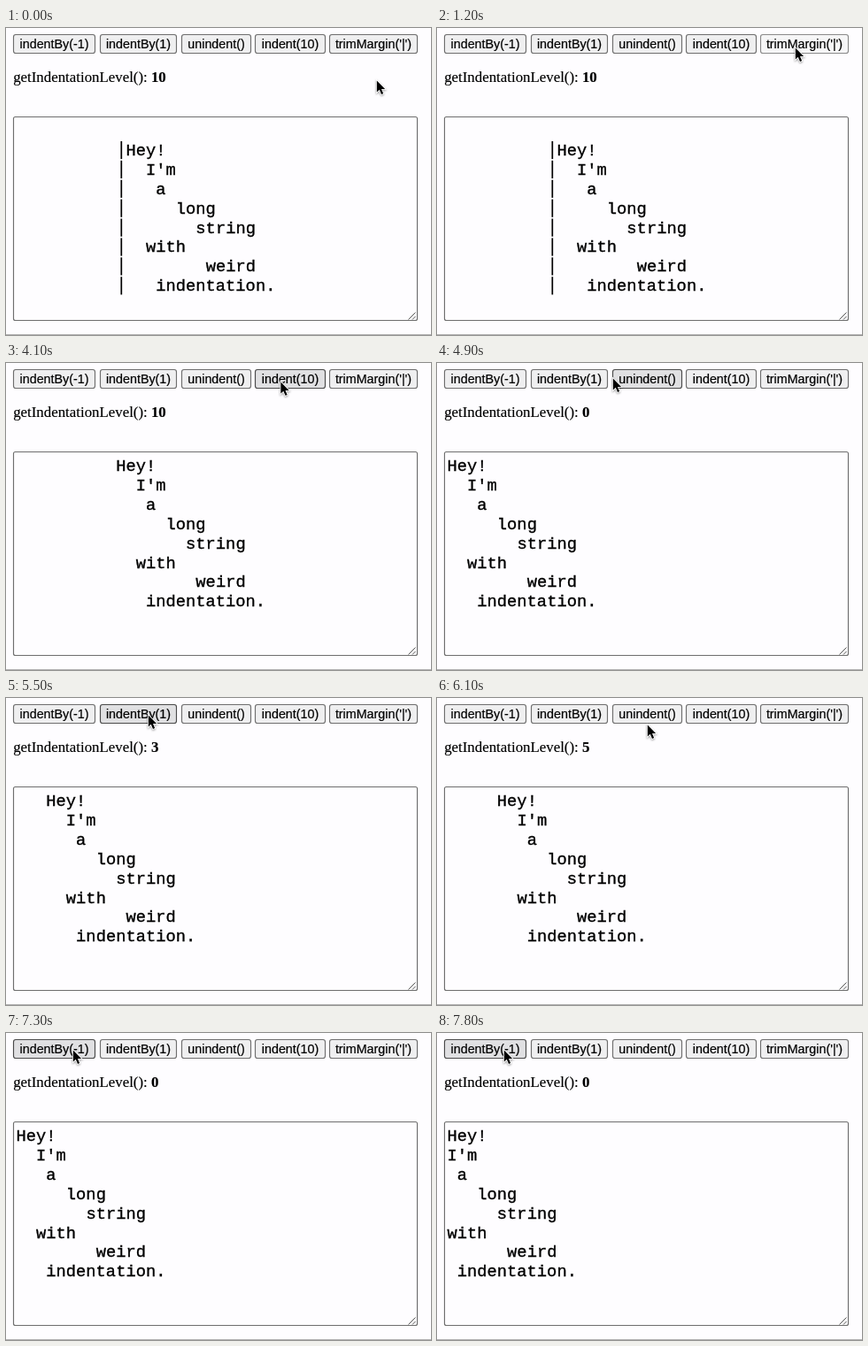
An HTML page for the animation above (8000 ms loop, 480x347 px).

```html
<!DOCTYPE html>
<html lang="en">
<head>
<meta charset="utf-8">
<title>Indentation demo</title>
<style>
  html, body { margin: 0; width: 100%; height: 100%; overflow: hidden; background: #fefdff; }
  svg { display: block; width: 480px; height: 347px; }
  rect { stroke: #6e6e6e; stroke-width: 1.15; }
  .button rect { fill: #efeff0; }
  .button.hover rect { fill: #e0e0e2; stroke: #4a4a4a; }
  .button.active rect { fill: #f6f6f7; stroke: #8a8a8a; }
  .button text { font: 14.3px "Liberation Sans", Arial, sans-serif; text-anchor: middle; stroke: #000; stroke-width: .2; }
  .level { font: 16.85px "Liberation Serif", Times, serif; stroke: #000; stroke-width: .15; }
  #level { font-weight: bold; }
  #lines { font: 18.78px "Liberation Mono", "Courier New", monospace; stroke: #000; stroke-width: .35; }
  #bars { stroke: #000; stroke-width: 1.7; }
  #cursor { stroke: #fff; stroke-width: 1.7; paint-order: stroke; filter: drop-shadow(0 1px 1px #0006); }
</style>
</head>
<body>
<svg viewBox="0 0 480 347">
  <g id="buttons"></g>
  <text class="level" x="8.2" y="61">getIndentationLevel(): <tspan id="level"></tspan></text>
  <rect x="8.5" y="100.5" width="456" height="230" rx="2" fill="none"/>
  <path d="M454.5 329.5l8-8M459 329.5l3.5-3.5" stroke="#555"/>
  <g id="bars"></g>
  <g id="lines"></g>
  <path d="M0 346.5H480" stroke="#b4b4b4"/>
  <path id="cursor" d="M.8 1.5V14.6L3.8 11.8L6 16.9L8.1 16L6 11H10.1Z"/>
</svg>
<script>
const LOOP = 8000, STEP = 100, LEFT = 11.5, CHAR = 11.27, LINE = 21.9, BASELINE = 122;
const byId = id => document.getElementById(id);

function add(parent, tag, attrs, text = '') {
  const el = document.createElementNS('http://www.w3.org/2000/svg', tag);
  for (const key in attrs) el.setAttribute(key, attrs[key]);
  el.textContent = text;
  return parent.appendChild(el);
}

const buttons = [
  ['indentBy(-1)', 8, 93], ['indentBy(1)', 106, 87], ['unindent()', 198, 79],
  ['indent(10)', 281, 80], ['trimMargin(\'|\')', 365, 100]
].map(([label, x, width]) => {
  const el = add(byId('buttons'), 'g', { class: 'button' });
  add(el, 'rect', { x: x + .5, y: 7.5, width: width - 1, height: 21, rx: 2.5 });
  add(el, 'text', { x: x + width / 2, y: 23 }, label);
  return { el, x, width };
});

const indents = [0, 2, 3, 5, 7, 2, 8, 3];
const words = ['Hey!', "I'm", 'a', 'long', 'string', 'with', 'weird', 'indentation.']
  .map((word, i) => {
    const y = BASELINE + LINE * (i + 1);
    add(byId('bars'), 'path', { d: `M130.3 ${y - 16}v20.2` });
    return add(byId('lines'), 'text', {}, word);
  });

const shift = n => list => list.map(v => Math.max(0, v + n));
const unindent = list => shift(-Math.min(...list))(list);

// press time, release time, effect on the indents
const clicks = [
  [1200, 1800, list => list], [3400, 3600, shift(10)], [4600, 4700, unindent],
  ...[0, 1, 2, 3, 4].map(i => [5000 + i * 200, 5100 + i * 200, shift(1)]),
  [6400, 6500, unindent], [7400, 7500, shift(-1)], [7700, 7800, shift(-1)]
];

// time, x, y of the pointer tip
const path = [
  [0, 418, 58], [500, 404, 21], [2400, 404, 21], [2600, 374, 28], [2800, 322, 23],
  [3000, 319, 20], [4000, 319, 20], [4500, 228, 19], [4800, 228, 19], [4900, 198, 16],
  [5000, 160, 18], [5900, 160, 18], [6000, 198, 26], [6100, 237, 29], [6300, 237, 19],
  [6600, 237, 19], [7100, 76, 19], [7200, 76, 19], [7300, 75, 18], [LOOP, 75, 18]
];

function pointer(t) {
  const i = path.findIndex(p => p[0] > t);
  const [t0, x0, y0] = path[i - 1], [t1, x1, y1] = path[i];
  const u = (t - t0) / (t1 - t0), k = u * u * (3 - 2 * u);
  return [x0 + (x1 - x0) * k, y0 + (y1 - y0) * k];
}

function render(t) {
  const [x, y] = pointer(t);
  byId('cursor').setAttribute('transform', `translate(${x} ${y})`);

  const pressed = clicks.some(([down, up]) => t >= down && t < up);
  for (const b of buttons) {
    const over = x >= b.x && x < b.x + b.width && y >= 7 && y < 29;
    b.el.setAttribute('class', 'button' + (over ? pressed ? ' active' : ' hover' : ''));
  }

  const done = clicks.filter(click => t >= click[1]);
  const margin = !done.length;
  const current = done.reduce((list, click) => click[2](list), indents);
  byId('level').textContent = margin ? 10 : Math.min(...current);
  byId('bars').setAttribute('visibility', margin ? 'visible' : 'hidden');
  words.forEach((word, i) => {
    word.setAttribute('x', LEFT + CHAR * (current[i] + (margin ? 11 : 0)));
    word.setAttribute('y', BASELINE + LINE * (i + margin));
  });
}

function frame() {
  const t = performance.now() % LOOP;
  render(Math.floor(t / STEP) * STEP);
  requestAnimationFrame(frame);
}
frame();
</script>
</body>
</html>
```
